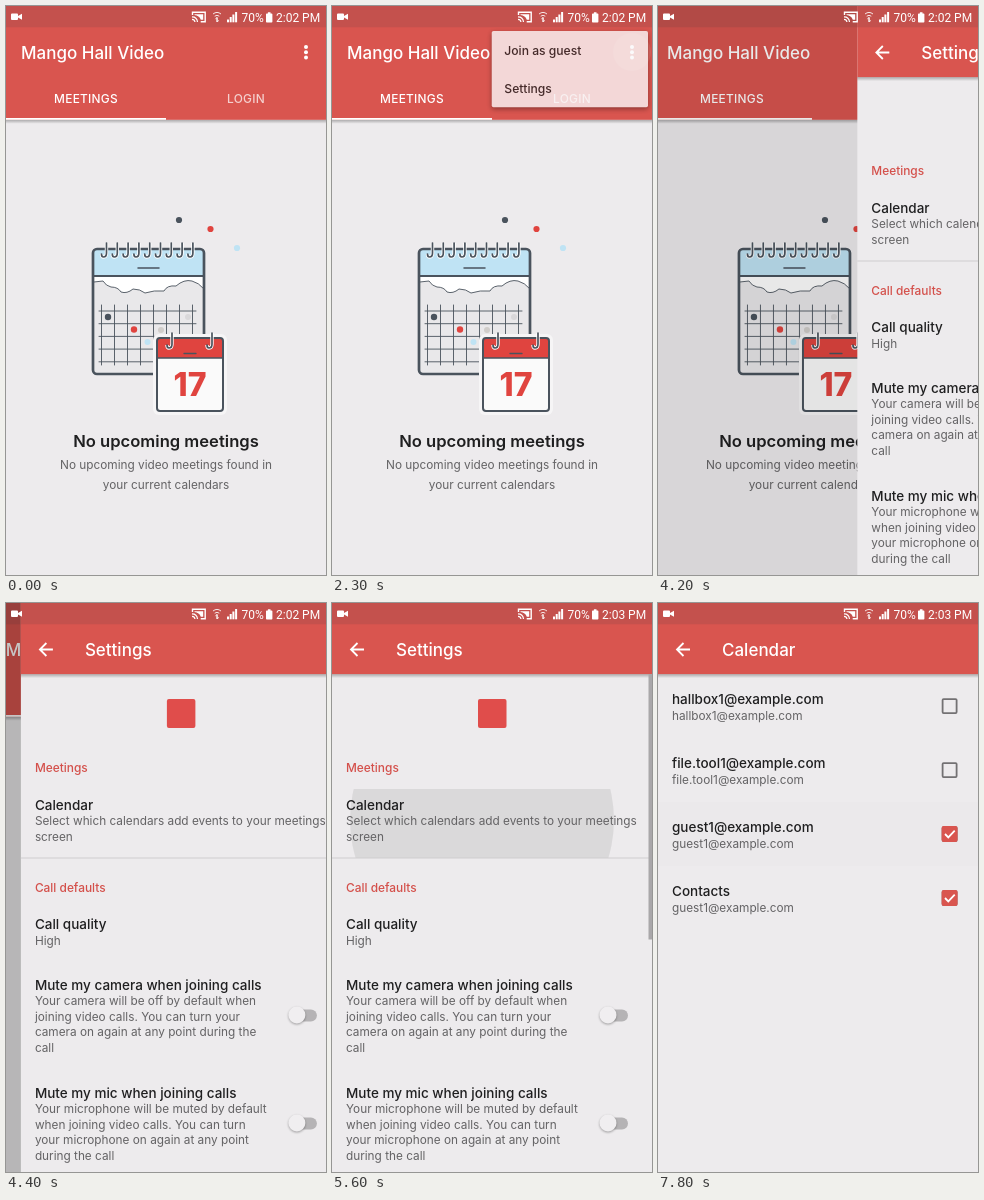
Animation of 320x569 px, one loop 8 s. Source, as an HTML page:

```html
<!DOCTYPE html>
<html lang="en">
<head>
<meta charset="utf-8">
<title>Meeting app settings</title>
<style>
  html, body { margin: 0; height: 100%; overflow: hidden; background: #edebed; }
  svg { display: block; width: 100vw; height: 100vh; font: 500 13.5px Inter, sans-serif; fill: #1f1f20; }
  .title { font-size: 17px; fill: #fff; }
  .tab { font-size: 11.9px; letter-spacing: .25px; fill: #fff; text-anchor: middle; }
  .small { font-size: 11.8px; font-weight: 400; fill: #646365; }
  .section { font-size: 11.9px; fill: #d4504b; }
  .mid { text-anchor: middle; }
  .line { fill: none; stroke: #4a535d; stroke-linecap: round; }
  .white { fill: none; stroke: #fff; }
  #popup rect.card { filter: drop-shadow(0 2px 3px #0007); }
  .knob { filter: drop-shadow(0 1px 1px #0005); }
</style>
</head>
<body>
<svg id="stage" viewBox="0 0 320 569"></svg>
<script>
const RED = '#d9554f', BG = '#edebed', DARK = '#4a535d', BLUE = '#bfe3f4', CRIMSON = '#e0443f';

const text = (x, y, s, cls = '') => `<text x="${x}" y="${y}" class="${cls}">${s}</text>`;
const rect = (x, y, w, h, fill, more = '') =>
  `<rect x="${x}" y="${y}" width="${w}" height="${h}" fill="${fill}" ${more}/>`;
const dot = (x, y, r, fill, more = '') => `<circle cx="${x}" cy="${y}" r="${r}" fill="${fill}" ${more}/>`;
const line = (d, width, cls = 'line') => `<path d="${d}" class="${cls}" stroke-width="${width}"/>`;
const range = (n, f) => Array.from({ length: n }, (_, i) => f(i)).join('');
const lines = (x, y, step, rows, cls) => rows.map((s, i) => text(x, y + i * step, s, cls)).join('');

const header = h => rect(0, h, 320, 4, 'url(#shade)') + rect(0, 0, 320, h, RED) + rect(0, 0, 320, 21.3, '#c4514d');
const subHeader = name => header(71.1) + line('M32 46.5H19M25.5 40L19 46.5L25.5 53', 1.8, 'white') + text(64, 53, name, 'title');

// Binder ring: a stem that curls to the left, with a pale edge
const ring = (x, y, h) => {
  const d = `M${x} ${y}v${h}q0 4-3 4-2 0-2-3`;
  return line(d, 3.4, 'white') + line(d, 1.7);
};

const wave = 'M88 276L97 275Q100 280 105 281Q112 281 115 286Q121 288 127 283Q134 283 139 287Q148 284 158 285Q161 279 170 280Q178 273 186 275Q193 277 197 282';
const bigCalendar =
  rect(87, 243, 111, 125, '#e9e8ea', 'rx="4"') +
  `<path d="M87 270V247q0-4 4-4h103q4 0 4 4v23z" fill="${BLUE}"/>` +
  `<path d="${wave}V270H88z" fill="#fff"/>` + line(wave, .9) +
  line('M88 270H197', 1.8) + line('M132 262H153', 1.5) +
  range(8, i => line(`M${95.5 + 13 * i} 299V359`, .9)) +
  range(5, i => line(`M93 ${305 + 12.7 * i}H190`, .9)) +
  '<rect x="87" y="243" width="111" height="125" rx="4" class="line" stroke-width="2.7"/>' +
  range(9, i => ring(100.5 + 10.8 * i, 237, 10)) +
  dot(102, 311, 3.2, DARK) + dot(128, 323.5, 3.2, CRIMSON) + dot(155, 324, 3, '#d0cdca') +
  dot(182, 311, 3, '#d9d8da') + dot(141.5, 336, 3, BLUE);

const smallCalendar =
  rect(147, 328, 74, 81, '#f6f5f6', 'rx="6"') +
  rect(151, 332, 66, 73, '#fafafa', 'rx="3"') +
  `<path d="M151 352V335q0-3 3-3h60q3 0 3 3v17z" fill="${CRIMSON}"/>` +
  line('M151 352H217', 1.7) + line('M178 347.5H190', 1.3) +
  '<rect x="151" y="332" width="66" height="73" rx="3" class="line" stroke-width="2"/>' +
  ring(166, 327, 11) + ring(206, 327, 11) +
  `<text x="184" y="390" class="mid" style="font-size:32px;font-weight:800;fill:${CRIMSON}">17</text>`;

const home = rect(0, 0, 320, 569, BG) + header(113.8) +
  text(15, 53, 'Mango Hall Video', 'title') +
  range(3, i => dot(300, 41 + 5.3 * i, 2, '#fff')) +
  dot(300, 46, 0, '#fff', 'id="dotsRipple"') +
  text(80, 97, 'MEETINGS', 'tab') + `<g opacity=".72">${text(240, 97, 'LOGIN', 'tab')}</g>` +
  rect(0, 112, 160, 1.8, '#fff') +
  dot(173, 214, 3.1, DARK) + dot(204.5, 223, 3.1, CRIMSON) + dot(231, 242, 3.1, BLUE) +
  bigCalendar + smallCalendar +
  '<text x="160" y="441" class="mid" font-size="16.6" font-weight="600">No upcoming meetings</text>' +
  lines(160, 462.5, 20.5, ['No upcoming video meetings found in', 'your current calendars'], 'small mid');

const popup = rect(142, 25, 174, 85, '#faf9fa', 'rx="2" class="card"') +
  `<g clip-path="url(#itemClip)">${dot(230, 89, 0, '#000', 'id="itemRipple"')}</g>` +
  text(156, 51.5, 'Join as guest') + text(156, 94, 'Settings');

const toggle = y => rect(270, y - 5.5, 26, 12, '#b5b3b5', 'rx="6"') +
  dot(276, y, 8.5, '#f0eef0', 'class="knob"');

const settingsBody =
  `<g clip-path="url(#rowClip)">${dot(150, 217, 0, '#000', 'id="rowRipple"')}</g>` +
  rect(146, 96, 28.5, 29, '#e04d4b', 'rx="2"') +
  text(14, 168.5, 'Meetings', 'section') +
  text(14, 206.5, 'Calendar') +
  lines(14, 222, 16, ['Select which calendars add events to your meetings', 'screen'], 'small') +
  rect(0, 254.5, 320, 1, '#cfcdcf') +
  text(14, 288.5, 'Call defaults', 'section') +
  text(14, 326, 'Call quality') + text(14, 342, 'High', 'small') +
  text(14, 386.5, 'Mute my camera when joining calls') +
  lines(14, 402, 15.7, ['Your camera will be off by default when', 'joining video calls. You can turn your',
    'camera on again at any point during the', 'call'], 'small') +
  text(14, 494.5, 'Mute my mic when joining calls') +
  lines(14, 510, 15.7, ['Your microphone will be muted by default', 'when joining video calls. You can turn',
    'your microphone on again at any point', 'during the call'], 'small') +
  toggle(412) + toggle(520) + rect(316.5, 71, 3.5, 265.5, '#a9a7a9');

const tick = y => rect(283.6, y - 7.9, 16, 16, RED, 'rx="2"') + line(`M287 ${y}l3.3 3.4 6.4-6.8`, 1.8, 'white');
const accounts = [
  ['hallbox1@example.com'], ['file.tool1@example.com'], ['guest1@example.com'], ['Contacts', 'guest1@example.com']
];
const calendars = rect(0, 0, 320, 569, BG) + subHeader('Calendar') +
  rect(0, 199, 320, 64, '#000', 'id="pressed" opacity="0"') +
  dot(291.6, 231, 0, RED, 'id="boxRipple"') +
  accounts.map(([name, mail = name], i) => text(14, 101 + 64 * i, name) + text(14, 116.5 + 64 * i, mail, 'small') +
    `<rect x="284.6" y="${96.1 + 64 * i}" width="14" height="14" rx="1" fill="none" stroke="#737173" stroke-width="1.8"/>`).join('') +
  tick(295) + `<g id="newTick">${tick(0)}</g>`;

const statusBar = `<g fill="#fff" style="font:12px Roboto,sans-serif">
  <path d="M5 8.5q0-1 1-1h5q1 0 1 1v1.5l4-2.3v6l-4-2.3v1.6q0 1-1 1h-5q-1 0-1-1z"/>
  <path d="M186.5 9V6.3h12.7v9.4h-4.5" class="white" stroke-width="1.4"/>
  <path d="M188.5 8.3h8.7v5.4h-2.4q-1.5-4-6.3-4.6z"/>
  <path d="M186 10.8q5 0 5.5 5.2M186 13.3q2.5 0 3 2.7" class="white" stroke-width="1.2"/>
  <path d="M207 8q4-3.2 8 0M208.7 10.2q2.3-1.8 4.6 0" class="white" stroke-width="1" opacity=".85"/>
  <path d="M209.5 13.2l1.2-1.8v4.6M212.6 14.2l-1.2 1.8v-4.6" class="white" stroke-width=".9" opacity=".85"/>
  ${range(4, i => rect(221 + 2.7 * i, 13.5 - 2.5 * i, 2, 2.8 + 2.5 * i, '#fff'))}
  <path d="M260 8.3q0-.8.8-.8h1.1V6.3h2.6v1.2h1.1q.8 0 .8.8v7.4q0 .8-.8.8h-4.8q-.8 0-.8-.8z"/>
  <text x="235.5" y="16" fill="#fff">70%</text><text x="270" y="16" fill="#fff" id="clock"></text></g>`;

const stage = document.getElementById('stage');
stage.innerHTML = `<defs>
  <linearGradient id="shade" x2="0" y2="1"><stop stop-opacity=".28"/><stop offset="1" stop-opacity="0"/></linearGradient>
  <clipPath id="itemClip"><rect x="142" y="67" width="174" height="43"/></clipPath>
  <clipPath id="rowClip"><rect y="186" width="320" height="69"/></clipPath></defs>
  <g id="home">${home}</g>
  <g id="popup">${popup}</g>
  <rect id="dim" width="320" height="569" fill="#000"/>
  <g id="settings">${rect(0, 0, 320, 569, BG)}${subHeader('Settings')}${settingsBody}</g>
  <g id="calendars">${calendars}</g>${statusBar}`;

const el = id => document.getElementById(id);
const set = (id, attrs) => { for (const k in attrs) el(id).setAttribute(k, attrs[k]); };
const ramp = (t, start, length) => Math.min(1, Math.max(0, (t - start) / length));
const easeOut = (u, power = 2) => 1 - (1 - u) ** power;

function ripple(id, t, start, length, radius, alpha) {
  const u = ramp(t, start, length);
  set(id, { r: radius * easeOut(u), opacity: alpha * Math.min(1, 2 - 2 * u) });
}

function draw(t) {
  ripple('dotsRipple', t, 1950, 450, 20, .22);
  ripple('itemRipple', t, 3320, 650, 110, .1);
  ripple('rowRipple', t, 5420, 550, 240, .08);
  ripple('boxRipple', t, 7250, 550, 17, .2);

  const open = easeOut(ramp(t, 2120, 330)), scale = .5 + .5 * open;
  set('popup', {
    opacity: open * (1 - ramp(t, 3800, 280)),
    transform: `translate(316 25) scale(${scale}) translate(-316 -25)`
  });

  const slide = easeOut(ramp(t, 4150, 500), 4.4);
  set('home', { transform: `translate(${-16 * slide} 0)` });
  set('dim', { opacity: .24 * slide });
  set('settings', { transform: `translate(${320 * (1 - slide)} 0)` });

  set('calendars', { opacity: easeOut(ramp(t, 5780, 300)) });
  const checked = easeOut(ramp(t, 7350, 200));
  set('newTick', {
    opacity: checked,
    transform: `translate(291.6 231) scale(${.6 + .4 * checked}) translate(-291.6 0)`
  });
  set('pressed', { opacity: .03 * Math.sin(Math.PI * ramp(t, 7250, 600)) });
  el('clock').textContent = t < 5600 ? '2:02 PM' : '2:03 PM';
}

const start = performance.now();
function loop() {
  draw((performance.now() - start) % 8000);
  requestAnimationFrame(loop);
}
loop();
</script>
</body>
</html>
```
